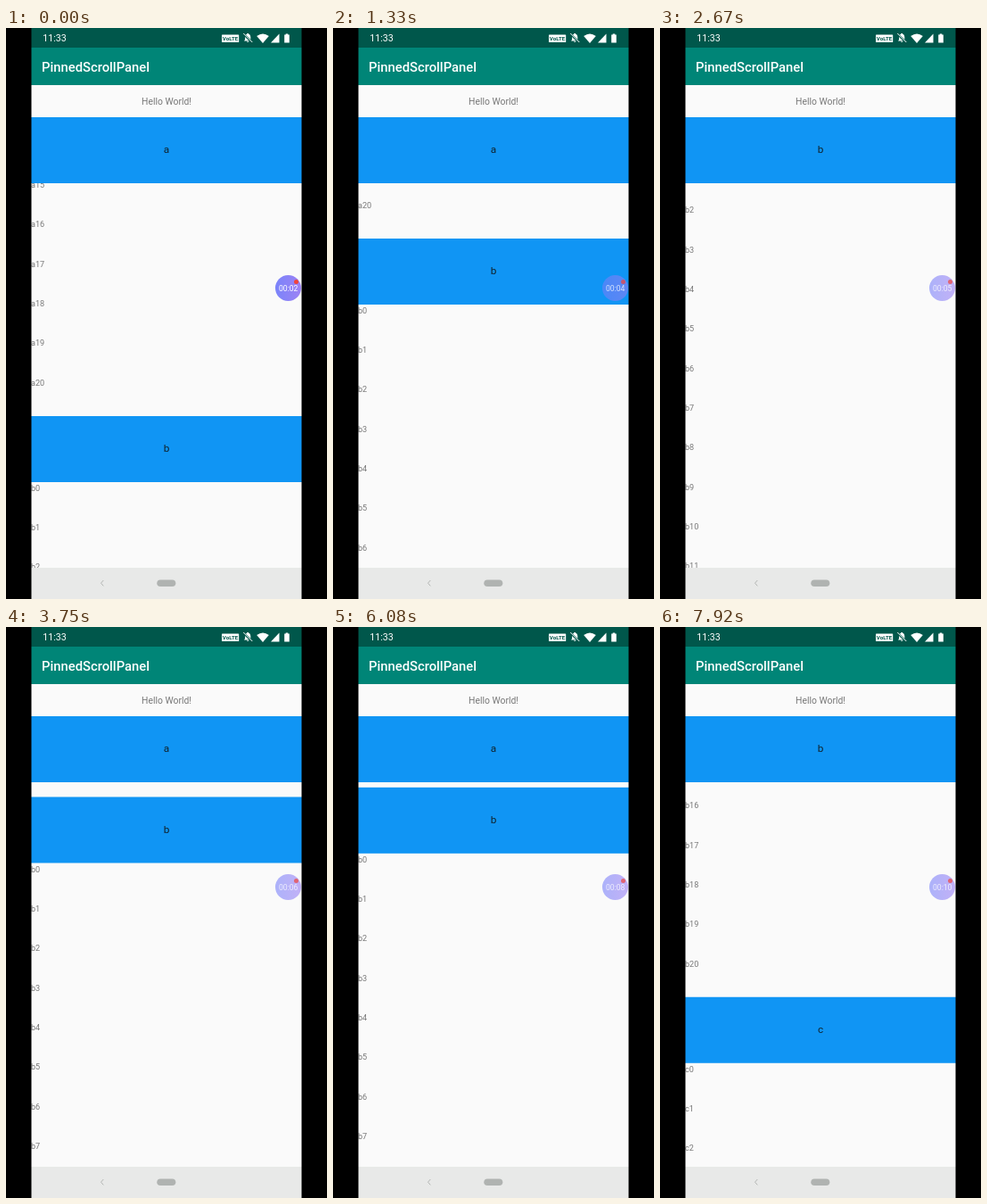
These frames come from a looping animation (360x640 px, 8 s). An HTML page:

```html
<!DOCTYPE html>
<html lang="en">
<head>
<meta charset="utf-8">
<title>Sticky headers</title>
<style>
  html, body { margin: 0; width: 100%; height: 100%; overflow: hidden; background: #000; }
  body { position: relative; font-family: Roboto, sans-serif; }
  #phone { position: absolute; left: 28px; top: 0; width: 304px; height: 640px; overflow: hidden; background: #fafafa; }
  #phone > * { position: absolute; left: 0; width: 100%; }
  #phone::after { content: ""; position: absolute; inset: 0; border: solid rgba(0, 0, 0, .5); border-width: 0 1px; }
  #status { top: 0; height: 22px; background: #00574b; }
  #clock { position: absolute; left: 13.3px; top: 0; line-height: 23px; font-size: 10.6px; color: #fff; }
  #icons { position: absolute; left: 212px; top: 0; }
  #title { top: 22px; height: 42px; background: #008577; color: #fff; font: 500 14.8px/44px Roboto, sans-serif; text-indent: 12px; }
  #hello { top: 64px; height: 36px; line-height: 37px; font-size: 10.36px; text-align: center; color: #777; }
  #list { top: 100px; height: 505px; overflow: hidden; }
  #list div { position: absolute; left: 0; }
  .item { font-size: 9.1px; line-height: 13px; color: #777; white-space: nowrap; }
  #list .head { top: 0; width: 100%; background: #1095f4; font-size: 11.84px; text-align: center; color: #10232f; }
  #nav { top: 605px; height: 35px; background: #e8e9e8; }
  #badge { position: absolute; left: 302px; top: 277px; width: 29.4px; height: 29.4px; border-radius: 50%;
    background: linear-gradient(90deg, #747efa, #987cf4); }
  #timer { position: absolute; left: 302px; top: 277px; width: 29.4px; line-height: 30px; font-size: 8.6px; text-align: center; color: #fff; }
  #dot { position: absolute; left: 322.8px; top: 282.2px; width: 5px; height: 5px; border-radius: 50%; background: #f0433a; }
</style>
</head>
<body>
<div id="phone">
  <div id="list"></div>
  <div id="hello">Hello World!</div>
  <div id="title">PinnedScrollPanel</div>
  <div id="status">
    <span id="clock">11:33</span>
    <svg id="icons" width="84" height="22" fill="#fff">
      <rect x="2" y="7.5" width="19.2" height="8.6" rx="0.6"/>
      <text x="11.6" y="14" font-size="6.2" font-weight="700" text-anchor="middle" fill="#00574b" font-family="Roboto, sans-serif">VoLTE</text>
      <path d="M27 14.5h8.4l-1.1-1.5v-3q0-2.6-2.2-3.2v-.8h-1.8v.8q-2.2.6-2.2 3.2v3zM30 15.2h2.4q-1.2 1.8-2.4 0z"/>
      <path d="M26 6.4l10.3 10" stroke="#00574b" stroke-width="2.2"/>
      <path d="M26.3 6l10 10" stroke="#fff" stroke-width="1"/>
      <path d="M41.2 9q6.9-5 13.6 0l-6.8 8z"/>
      <path d="M57 16.5h9.5v-10z"/>
      <path d="M72.2 7.4h1.5v-1h2.6v1h1.5v9.2h-5.6z"/>
    </svg>
  </div>
  <div id="nav">
    <svg width="304" height="35">
      <path d="M81.3 14l-2.8 3.2 2.8 3.2" fill="none" stroke="#b4b6b4" stroke-width="1"/>
      <rect x="141.3" y="13.5" width="21" height="7.6" rx="3.8" fill="#b0b3b1"/>
    </svg>
  </div>
</div>
<div id="badge"></div>
<div id="timer"></div>
<div id="dot"></div>
<script>
const FRAMES = 96, LOOP = 8000, STEP = LOOP / FRAMES;
const ROW = 44.35, HEAD = 73.82, COUNT = 21, SECTION = HEAD + ROW * COUNT;
const LIST_TOP = 100, LIST_HEIGHT = 505, TEXT_DROP = 0.8, CLOCK_START = 2.8;

// [time in steps, screen y of the second section's top]
const scrollKeys = [
  [0, 435], [16, 236], [32, 34.7], [45, 190.5], [51, 174], [58, 116.5],
  [60, 100], [65, 84], [67, 84], [73, 179.8], [74, 183], [77, 130], [95, -590.4]
];

const secants = scrollKeys.slice(1).map(([t, y], i) => (y - scrollKeys[i][1]) / (t - scrollKeys[i][0]));
const slopes = scrollKeys.map((_, i) => {
  const a = secants[i - 1] ?? secants[i], b = secants[i] ?? a;
  return a * b > 0 ? 2 * a * b / (a + b) : 0;
});

// Monotone cubic through the keys
function scrollAt(t) {
  const last = scrollKeys.length - 2;
  let i = 0;
  while (i < last && t >= scrollKeys[i + 1][0]) i++;
  const [t0, y0] = scrollKeys[i], [t1, y1] = scrollKeys[i + 1];
  const d = t1 - t0, u = (t - t0) / d, v = 1 - u;
  return v * v * (1 + 2 * u) * y0 + u * u * (3 - 2 * u) * y1
    + d * u * v * (v * slopes[i] - u * slopes[i + 1]);
}

const byId = id => document.getElementById(id);
const list = byId('list'), badge = byId('badge'), timer = byId('timer'), dot = byId('dot');

function add(parent, className, text = '') {
  const el = document.createElement('div');
  el.className = className;
  el.textContent = text;
  return parent.appendChild(el);
}

const sections = [...'abc'].map(name => {
  const rows = add(list, 'rows');
  for (let i = 0; i < COUNT; i++) {
    add(rows, 'item', name + i).style.top = HEAD + i * ROW + TEXT_DROP + 'px';
  }
  return { name, rows };
});
for (const section of sections) {
  section.head = add(list, 'head', section.name);
  section.head.style.height = section.head.style.lineHeight = HEAD + 'px';
}

const moveY = (el, y) => { el.style.transform = `translateY(${y.toFixed(2)}px)`; };

function draw(step) {
  const origin = scrollAt(step) - LIST_TOP;
  sections.forEach(({ rows, head }, i) => {
    const top = origin + (i - 1) * SECTION;
    const headY = Math.max(top, Math.min(0, top + SECTION - HEAD));
    moveY(rows, top);
    moveY(head, headY);
    head.style.visibility = headY > -HEAD && headY < LIST_HEIGHT ? 'visible' : 'hidden';
  });
  const seconds = step * STEP / 1000;
  const fade = Math.min(1, Math.max(0, (seconds - 0.3) / 0.4));
  badge.style.opacity = 0.95 - 0.37 * fade;
  timer.style.opacity = 1 - 0.25 * fade;
  dot.style.opacity = 1 - 0.3 * fade;
  timer.textContent = '00:' + String(Math.floor(CLOCK_START + seconds)).padStart(2, '0');
}

const start = performance.now();
function tick() {
  const t = (performance.now() - start) % LOOP;
  draw(Math.min(FRAMES - 1, Math.floor((t + 4) / STEP)));
  requestAnimationFrame(tick);
}
tick();
</script>
</body>
</html>
```
